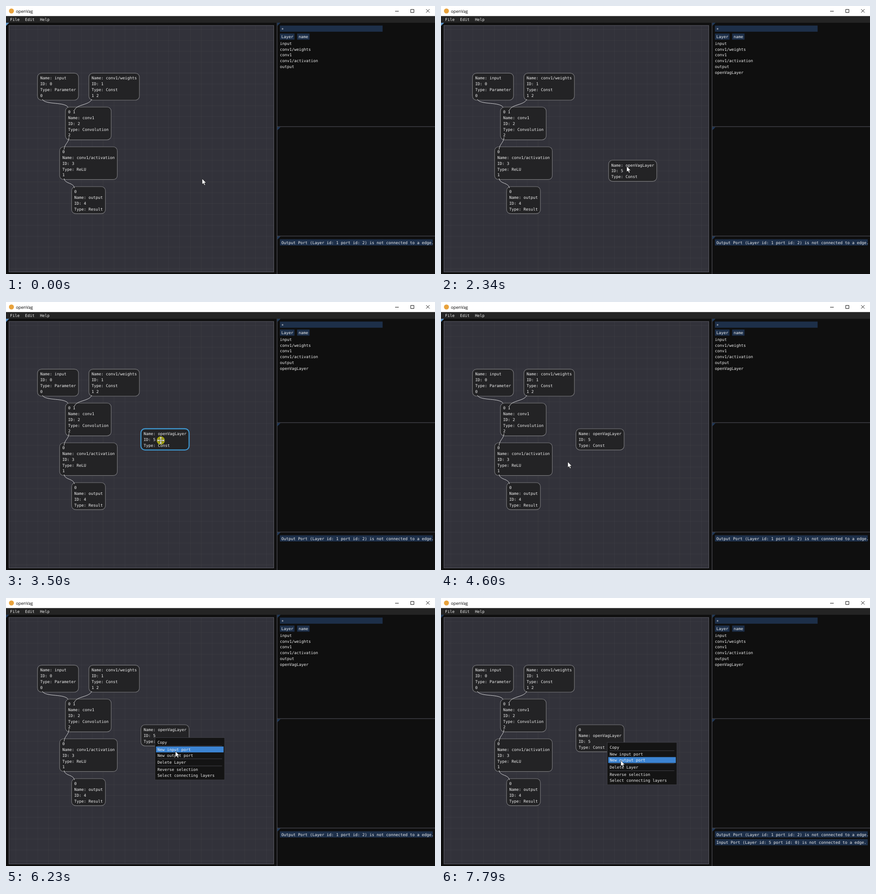
Recreate the animation shown at these times as an HTML page. Size 946 px wide and 592 px high, loop 7.99 s.

```html
<!DOCTYPE html>
<html lang="en">
<head>
<meta charset="utf-8">
<title>Node editor</title>
<style>
  html, body { margin: 0; width: 946px; height: 592px; overflow: hidden; background: #0f0f0f; }
  svg { display: block; }
  text { font: 8.73px "DejaVu Sans Mono", monospace; fill: #f0f0f0; white-space: pre; text-rendering: geometricPrecision; }
  .title { font: 9.2px "Open Sans", sans-serif; fill: #000; }
</style>
</head>
<body>
<svg id="stage" width="946" height="592" viewBox="0 0 946 592"></svg>
<script>
const LOOP = 7990, STEP = 70;
const SCALE = .751, CHAR = 7 * SCALE, ROW = 17 * SCALE, GRID = 32 * SCALE;
const stage = document.getElementById('stage');

function add(parent, tag, attrs = {}, content) {
  const el = document.createElementNS('http://www.w3.org/2000/svg', tag);
  for (const k in attrs) el.setAttribute(k, attrs[k]);
  if (content !== undefined) el.textContent = content;
  parent.appendChild(el);
  return el;
}
const rect = (p, x, y, width, height, fill, more) =>
  add(p, 'rect', { x, y, width, height, fill, ...more });
// y is the vertical middle of the text row
const label = (p, x, y, str, fill = '#f0f0f0') =>
  add(p, 'text', { x, y: y + 3.2, style: 'fill:' + fill }, str);
const path = (p, d, more) => add(p, 'path', { d, ...more });
const line = (p, d, stroke, width = 1) => path(p, d, { fill: 'none', stroke, 'stroke-width': width });
const group = (p = stage) => add(p, 'g');
const show = (el, on) => el.setAttribute('visibility', on ? 'visible' : 'hidden');
const place = (el, x, y) => el.setAttribute('transform', `translate(${x} ${y})`);

// window frame
rect(stage, 0, 0, 946, 22.5, '#fff');
add(stage, 'circle', { cx: 12, cy: 11, r: 5.5, fill: '#e8a23c' });
add(stage, 'text', { x: 22, y: 14.6, class: 'title' }, 'openVag');
line(stage, 'M858 11.5h8M892.5 7.5h7v7h-7zM926.5 7l7.5 7.5M934 7l-7.5 7.5', '#111');
rect(stage, 0, 22.5, 946, 14.5, '#242424');
['File', 'Edit', 'Help'].forEach((s, i) => label(stage, 9 + 33 * i, 30, s));

// canvas with grid
rect(stage, 6.5, 43, 584, 544.5, '#32323a', { stroke: '#5c5c66' });
let grid = '';
for (let x = 21.9; x < 590; x += GRID) grid += `M${x} 43.5V587`;
for (let y = 52; y < 587; y += GRID) grid += `M7 ${y}H590`;
line(stage, grid, 'rgba(120,120,120,.15)', .8);

// right side panels
line(stage, 'M597.7 37V592M598 266.5H946M598 508.2H946', '#414147', 1.6);
const corner = (x, y) => path(stage, `M${x} ${y}h7l-7 7z`, { fill: '#20395a' });
const mainCorner = corner(0, 37);
[37, 267.4, 509].forEach(y => corner(598.4, y));

function field(p, x, y, w, str, drop = 0) {
  rect(p, x, y, w, 13.6, '#1d2f49');
  label(p, x + 3.2, y + 7 + drop, str);
}
field(stage, 604, 43.2, 226.5, '*', 1.8);
field(stage, 604, 60.8, 32.2, 'Layer');
field(stage, 642, 60.8, 27.3, 'name');
const names = ['input', 'conv1/weights', 'conv1', 'conv1/activation', 'output', 'openVagLayer']
  .map((s, i) => label(stage, 604, 82.6 + ROW * i, s));
field(stage, 604, 515.4, 337, 'Output Port (Layer id: 1 port id: 2) is not connected to a edge.');
const portNote = group();
field(portNote, 604, 532.7, 337, 'Input Port (Layer id: 5 port id: 0) is not connected to a edge.');

// nodes
function node(x, y, name, id, type, ins, outs) {
  const g = group();
  const rows = [ins, 'Name: ' + name, 'ID: ' + id, 'Type: ' + type, outs].filter(Boolean);
  const w = 11.6 + CHAR * Math.max(...rows.map(r => r.length));
  g.box = rect(g, 0, 0, w, 8.6 + ROW * rows.length, '#232325',
    { rx: 9, stroke: '#7b7b7e', 'stroke-width': 1.15 });
  rows.forEach((r, i) => label(g, 6, 11 + ROW * i, r));
  place(g, x, y);
  return g;
}
node(69.4, 148.3, 'input', 0, 'Parameter', '', '0');
node(182.7, 148.3, 'conv1/weights', 1, 'Const', '', '1 2');
node(131, 223.2, 'conv1', 2, 'Convolution', '0 1', '2');
node(118.2, 311, 'conv1/activation', 3, 'ReLU', '0', '1');
node(144.6, 399, 'output', 4, 'Result', '0', '');

function link(ax, ay, bx, by) {
  const lean = (bx - ax) * .12, bend = 13;
  line(stage, `M${ax} ${ay}C${ax + lean} ${ay + bend} ${bx - lean} ${by - bend} ${bx} ${by}`, '#dcdcde');
}
link(80, 206, 137, 224);
link(189, 206, 151, 230);
link(139, 290, 128, 317);
link(128, 381, 151, 402);

const HOME = [369.5, 340.5], GRAB = [405.5, 358.5], DROP = [333.5, 298];
const fresh = ins => node(...HOME, 'openVagLayer', 5, 'Const', ins, '');
const bare = fresh(''), ported = fresh('0');

// popup menu; items are [text, shortcut, disabled], null is a separator
function menu(from, to, x, y, w, items) {
  const g = group(), rows = [];
  place(g, x, y);
  const back = rect(g, 0, 0, w, 0, '#141414', { stroke: '#3d3d44' });
  const hot = rect(g, 2.3, 0, w - 4.6, 13, '#3c84d2');
  let mid = 10.5;
  for (const item of items) {
    if (!item) {
      line(g, `M5.5 ${mid - 5}H${w - 5.5}`, '#43434a');
      mid += 3;
      continue;
    }
    const [str, key, off] = item;
    label(g, 5.5, mid, str, off ? '#7c7c7c' : '#f0f0f0');
    if (key) label(g, 59.5, mid, key, off ? '#4c4c4c' : '#858585');
    if (!off) rows.push(mid);
    mid += ROW;
  }
  back.setAttribute('height', mid - 2.7);

  return (t, px, py) => {
    const on = within(t, from, to);
    const row = on && px >= x && px <= x + w && rows.find(r => Math.abs(py - y - r) < ROW / 2);
    show(g, on);
    show(hot, !!row);
    if (row) hot.setAttribute('y', row - 6.6);
    return on;
  };
}
const layerItems = [['Copy'], null, ['New input port'], ['New output port'], null,
  ['Delete Layer'], null, ['Reverse selection'], ['Select connecting layers']];
const menus = [
  menu(1030, 1990, 346, 305.2, 113,
    [['Copy', 'CTRL+C', true], ['Paste', 'CTRL+V'], null, ['New Layer']]),
  menu(5080, 6300, 328.5, 308.4, 153.6, layerItems),
  menu(6980, LOOP, 366.5, 319, 153.6, layerItems)
];

// pointer
const ring = add(stage, 'circle', { r: 9, opacity: .6 });
const arrow = path(stage, 'M0 0V12.6L2.9 9.9L5 14.6L7 13.7L5 9.2H8.9Z',
  { fill: '#fff', stroke: '#000', 'stroke-width': .6 });
const mover = group();
for (let turn = 0; turn < 360; turn += 90)
  path(mover, 'M-1 0V-4.8H-3L0-8L3-4.8H1V0',
    { fill: '#fff', stroke: '#222', 'stroke-width': .5, transform: `rotate(${turn})` });

// pointer moves: first and last update, end point, optional bend point
const START = [432.5, 381.5];
const moves = [
  [70, 680, [345.6, 305], [270, 255]],
  [1230, 1650, [369.5, 340]],
  [1990, 2340, [409.5, 354]],
  [2410, 2750, GRAB],
  [3080, 3500, DROP],
  [4250, 4460, [230.5, 398]],
  [4530, 4740, [328.5, 308.2]],
  [5280, 5280, [350, 321]],
  [5350, 5760, [375, 345]],
  [5830, 5900, [373.5, 338.5]],
  [6300, 6510, [366.5, 319.2]],
  [7180, 7660, [396.5, 359]]
];
const presses = [
  [830, 900, 'red'], [1850, 1920, 'yellow'], [3010, 4250, 'yellow'], [4460, 4530, 'yellow'],
  [5010, 5080, 'red'], [6160, 6230, 'yellow'], [6910, 6980, 'red']
];

const within = (t, a, b) => t >= a && t < b;
const ease = k => (1 - Math.cos(Math.PI * k)) / 2;

function pointer(t) {
  let at = START;
  for (const [from, to, end, bend] of moves) {
    if (t < from) break;
    if (t >= to) { at = end; continue; }
    const count = Math.round((to - from) / STEP) + 1;
    const k = ease((Math.floor((t - from) / STEP) + 1) / count);
    return at.map((a, i) => {
      const mid = bend ? bend[i] : (a + end[i]) / 2;
      return (1 - k) ** 2 * a + 2 * k * (1 - k) * mid + k * k * end[i];
    });
  }
  return at;
}

function render(t) {
  const [x, y] = pointer(t);
  // menus react one update late
  const late = pointer(t - STEP);
  const open = menus.map(draw => draw(t, ...late)).includes(true);
  mainCorner.setAttribute('fill', open ? '#20395a' : '#5c94c8');

  const made = t >= 1990, hasPort = t >= 6300;
  show(names[5], made);
  show(bare, made && !hasPort);
  show(ported, hasPort);
  show(portNote, hasPort);

  const held = t < 3010 ? GRAB : t < 4250 ? [x, y] : DROP;
  const spot = HOME.map((h, i) => h + held[i] - GRAB[i]);
  place(bare, ...spot);
  place(ported, ...spot);
  const picked = within(t, 3010, 4530);
  bare.box.setAttribute('stroke', picked ? '#3f97cf' : '#7b7b7e');
  bare.box.setAttribute('stroke-width', picked ? 2.3 : 1.15);

  const dragging = within(t, 3080, 4250), shift = dragging ? 7.8 : 0;
  show(arrow, !dragging);
  show(mover, dragging);
  place(arrow, x, y);
  place(mover, x + shift, y + shift);

  const press = presses.find(p => within(t, p[0], p[1]));
  show(ring, !!press);
  if (press) ring.setAttribute('fill', press[2]);
  place(ring, x + shift, y + shift);
}

function frame() {
  render(performance.now() % LOOP);
  requestAnimationFrame(frame);
}
frame();
</script>
</body>
</html>
```
